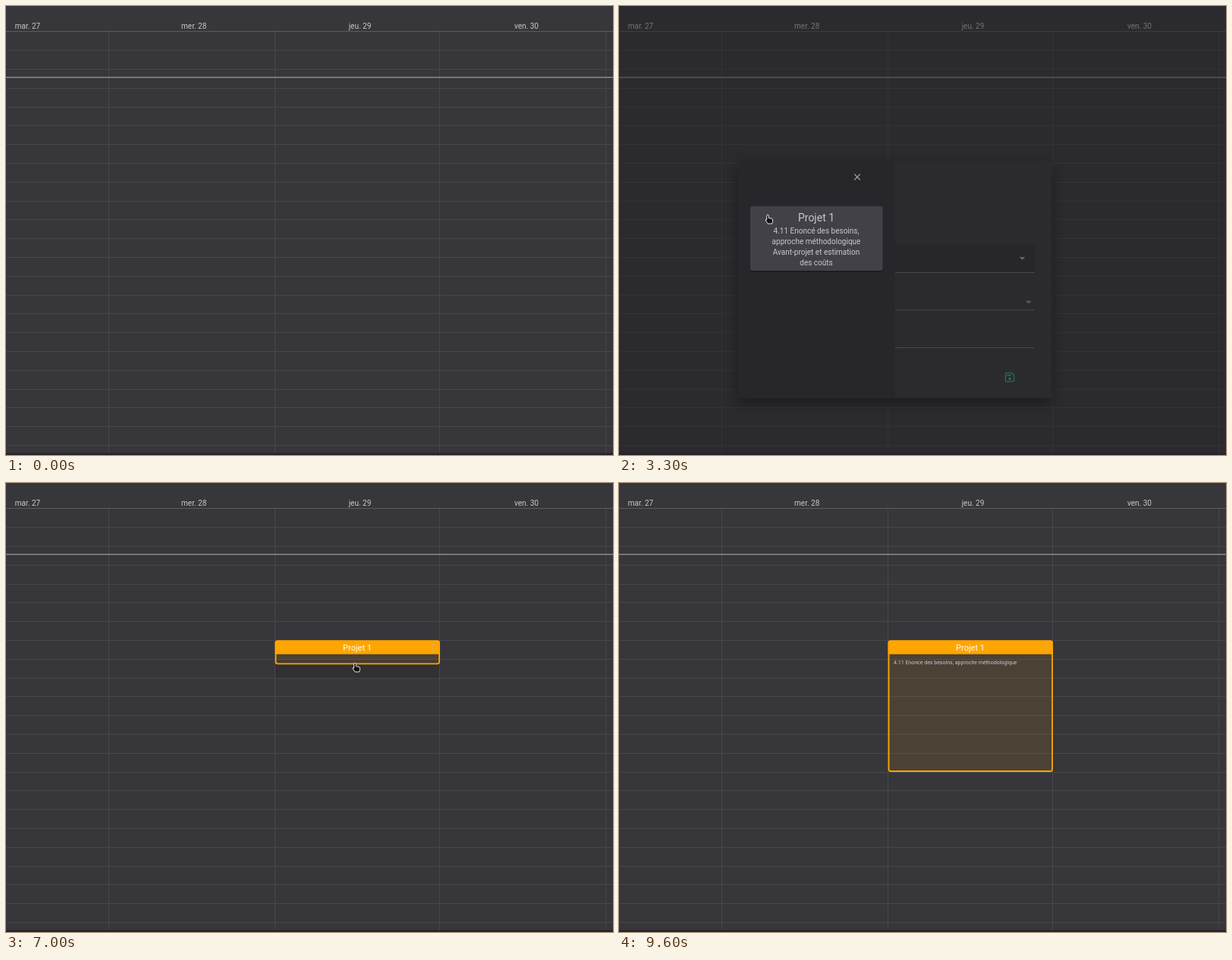
An HTML page that plays this animation: 800x592 px, repeating every 9.9 s.

```html
<!DOCTYPE html>
<html lang="fr">
<head>
<meta charset="utf-8">
<title>Nouvelle heure</title>
<style>
  html, body { margin: 0; width: 100%; height: 100%; overflow: hidden; background: #37363b; }
  svg { display: block; }
  text { font-family: Roboto, sans-serif; font-size: 11px; fill: #c9c9cb; }
  .mid { text-anchor: middle; }
  .small { font-size: 8.25px; }
  .medium { font-size: 10px; }
  .muted { fill: #98979b; }
  .rule { fill: #757478; }
  .icon { fill: none; stroke: #cfcfd1; stroke-width: 1.3; }
  .scrim { fill: rgb(32 31 35 / .5); }

  #backdrop, #dialog, #veil, #drawer, #starHover, #saveHover,
  .empty, .filled, #event, #note { animation: 9.9s linear infinite; }

  #backdrop { animation-name: backdrop; }
  @keyframes backdrop {
    0%, 14.4% { opacity: 0; }
    16.1%, 53% { opacity: 1; }
    55.5%, 100% { opacity: 0; }
  }
  #dialog {
    animation-name: dialog;
    transform-origin: 363px 360px;
    filter: drop-shadow(0 7px 9px rgb(0 0 0 / .36));
  }
  @keyframes dialog {
    0%, 14.4% { opacity: 0; transform: scale(.92); }
    16.1%, 53% { opacity: 1; transform: none; }
    55%, 100% { opacity: 0; transform: none; }
  }
  #veil { animation-name: veil; }
  @keyframes veil {
    0%, 30.8% { opacity: 0; }
    33.2%, 40.9% { opacity: 1; }
    43.4%, 100% { opacity: 0; }
  }
  #drawer { animation-name: drawer; }
  @keyframes drawer {
    0% { transform: translateX(-225px); }
    30.8% { transform: translateX(-225px); animation-timing-function: ease-out; }
    33.2% { transform: none; }
    40.9% { transform: none; animation-timing-function: ease-in-out; }
    43.4%, 100% { transform: translateX(-225px); }
  }

  #starHover, #saveHover, .empty, .filled, #event, #note { animation-timing-function: step-end; }
  #starHover { animation-name: star-hover; }
  @keyframes star-hover { 0% { opacity: 0; } 25.2% { opacity: 1; } 33.3%, 100% { opacity: 0; } }
  #saveHover { animation-name: save-hover; }
  @keyframes save-hover { 0% { opacity: 0; } 51.5% { opacity: 1; } 56%, 100% { opacity: 0; } }
  .empty { animation-name: empty; }
  @keyframes empty { 0% { opacity: 1; } 41.4%, 100% { opacity: 0; } }
  .filled { animation-name: filled; }
  @keyframes filled { 0% { opacity: 0; } 41.4%, 100% { opacity: 1; } }
  #event { animation-name: event; }
  @keyframes event { 0% { opacity: 0; } 54.5%, 100% { opacity: 1; } }
  #note { animation-name: note; }
  @keyframes note { 0% { opacity: 0; } 84.8%, 100% { opacity: 1; } }
</style>
</head>
<body>
<svg width="800" height="592" viewBox="0 0 800 592">
  <defs>
    <clipPath id="frame"><rect x="157" y="204" width="413" height="313" rx="4"/></clipPath>
    <path id="caret" d="M-3.800-2h7.600l-3.800 3.800z"/>
    <path id="cross" d="M-3.800-3.800 3.800 3.800M3.800-3.800-3.800 3.800" fill="none" stroke="#b4b3b7" stroke-width="1.1"/>
  </defs>

  <rect width="800" height="592" fill="#37363b"/>
  <rect id="slot" x="355" width="216" height="24" fill="#313035"/>
  <g id="grid" fill="#47464b"></g>
  <rect y="33" width="800" height="1" fill="#5b5a5f"/>
  <rect y="93.600" width="800" height="1" fill="#b3b3b5"/>
  <g>
    <text class="mid medium" x="28.5" y="30">mar. 27</text>
    <text class="mid medium" x="247.7" y="30">mer. 28</text>
    <text class="mid medium" x="466.5" y="30">jeu. 29</text>
    <text class="mid medium" x="686" y="30">ven. 30</text>
  </g>

  <g id="event">
    <rect id="body" x="355.5" y="208.5" width="215.5" rx="2.5"
          fill="#ffa500" fill-opacity=".1" stroke="#ffa500" stroke-width="1.8"/>
    <path d="M354.6 225.700v-15.200a3 3 0 0 1 3-3h211.300a3 3 0 0 1 3 3v15.200z" fill="#ffa500"/>
    <g fill="#c4b596">
      <circle cx="562.500" cy="213" r="1.100"/>
      <circle cx="562.500" cy="217.500" r="1.100"/>
      <circle cx="562.500" cy="222" r="1.100"/>
    </g>
    <text class="mid" x="463" y="221" style="fill:#fff">Projet 1</text>
    <text id="note" x="362" y="239" style="font-size:7px">4.11 Enoncé des besoins, approche méthodologique</text>
  </g>

  <rect id="backdrop" class="scrim" width="800" height="592"/>
  <rect y="589.5" width="800" height="2.500" fill="#2a2128"/>

  <g id="dialog"><g clip-path="url(#frame)">
    <rect x="157" y="204" width="413" height="313" fill="#37363b"/>
    <text x="173.5" y="230" style="font-size:14px;font-weight:500">Nouvelle heure</text>

    <circle id="starHover" cx="195.500" cy="280.500" r="16" fill="#414045"/>
    <path transform="translate(187.1 272.2) scale(.7)" fill="#c9c9cb"
          d="M12 17.270 18.180 21l-1.640-7.030L22 9.240l-7.190-.610L12 2 9.190 8.630 2 9.240l5.460 4.730L5.820 21z"/>

    <path d="M179 351v-34a3 3 0 0 1 3-3h363a3 3 0 0 1 3 3v34z" fill="#2f2e32"/>
    <rect class="rule" x="179" y="351" width="369" height="1"/>
    <text class="small" x="187" y="328">Tâche</text>
    <text class="empty" x="187" y="342" style="fill:#77767b">Search</text>
    <g class="filled">
      <text x="187" y="342">Avant-projet et estimation des coûts - 4.11 Enoncé des besoin…</text>
      <use href="#cross" x="508" y="332.500"/>
    </g>
    <use href="#caret" x="531.500" y="333" fill="#b4b3b7"/>

    <text class="empty muted" x="179" y="394.500">Type de temps</text>
    <g class="filled">
      <text class="small" x="179" y="376.500">Type de temps</text>
      <text x="179" y="394">Travail</text>
    </g>
    <use href="#caret" x="539.800" y="390.700" fill="#98979b"/>
    <rect class="rule" x="179" y="400.500" width="369" height="1"/>

    <text class="muted" x="179" y="444">Commentaire</text>
    <rect class="rule" x="179" y="450" width="369" height="1"/>

    <g class="icon" transform="translate(212 489.5)">
      <circle r="6.300"/>
      <path d="M-2.500-2.500 2.500 2.500M2.500-2.500-2.500 2.500"/>
    </g>
    <circle id="saveHover" cx="515" cy="490" r="16" fill="#374441"/>
    <g class="icon" transform="translate(515 489.5)" style="stroke:#1fc48d">
      <path d="M-5.600-4.600a1 1 0 0 1 1-1h7.500l2.700 2.700v7.500a1 1 0 0 1-1 1h-9.200a1 1 0 0 1-1-1z"/>
      <path d="M-3.800-2.700h5.600" stroke-width="1.800"/>
      <circle cy="2" r="1.800" fill="#1fc48d" stroke="none"/>
    </g>

    <rect id="veil" class="scrim" x="157" y="204" width="413" height="313"/>
    <g id="drawer">
      <rect x="157" y="204" width="207" height="313" fill="#27262b"/>
      <use href="#cross" x="314" y="225.500"/>
      <rect x="173" y="265" width="174.500" height="86" rx="3" fill="#1d1c20"/>
      <rect x="173" y="264" width="174.500" height="85" rx="3" fill="#424147"/>
      <text class="mid" x="260" y="283.500" style="font-size:14px">Projet 1</text>
      <text class="mid medium" x="260" y="300">4.11 Enoncé des besoins,</text>
      <text class="mid medium" x="260" y="314">approche méthodologique</text>
      <text class="mid medium" x="260" y="327.700">Avant-projet et estimation</text>
      <text class="mid medium" x="260" y="341.500">des coûts</text>
    </g>
  </g></g>

  <g id="pointer" fill="#111" stroke="#fff" stroke-width=".9" stroke-linejoin="round">
    <path id="hand" d="M-2.800 1v-5.300q0-1.500 1.300-1.500t1.300 1.500v2.800l4 .8q1.300.3 1.300 1.700v2.500l-1 2.500h-5.300l-3-4q-.6-1.200.4-1.600z"/>
    <path id="arrow" d="M-4-7v11.500l2.700-2.400 2 4.600 2-.9-2-4.400h3.500z"/>
  </g>
</svg>
<script>
  const LOOP = 9900, TOP = 33.4, ROW = 24.8;
  const $ = id => document.getElementById(id);
  const rowY = k => Math.round(TOP + ROW * k);

  function addLine(x, y, width, height) {
    const line = document.createElementNS('http://www.w3.org/2000/svg', 'rect');
    Object.entries({ x, y, width, height }).forEach(([k, v]) => line.setAttribute(k, v));
    $('grid').append(line);
  }
  for (let k = 1; k <= 22; k++) addLine(0, rowY(k), 800, 1);
  [135, 354, 571, 790].forEach(x => addLine(x, 34, 1, 556));

  // Each key: time, then values, linear in between.
  const path = [
    [100, 466, 588], [300, 450, 480], [600, 398, 275], [800, 372, 206], [900, 370, 223],
    [2000, 370, 223], [2200, 300, 258], [2400, 212, 302], [2500, 186, 304], [2600, 185.5, 291],
    [2900, 197.5, 281], [4200, 197.5, 281], [4400, 290, 400], [4600, 396.5, 479.5],
    [4800, 470, 494], [5000, 514.5, 493], [5700, 514.5, 493], [6100, 490, 360],
    [6500, 462, 229], [6800, 462, 229], [7100, 461, 250], [7600, 460, 339.5],
    [7800, 457, 372], [8100, 453, 389], [9499, 453, 389], [9500, 647, 235]
  ];
  const bottoms = [[6800, 231], [7100, 242], [7600, 315], [7800, 348], [8100, 380]];

  function at(keys, t) {
    const i = keys.findIndex(k => k[0] > t);
    if (i < 0) return keys[keys.length - 1].slice(1);
    if (i === 0) return keys[0].slice(1);
    const a = keys[i - 1], b = keys[i], f = (t - a[0]) / (b[0] - a[0]);
    return a.slice(1).map((v, n) => v + (b[n + 1] - v) * f);
  }
  const within = (t, a, b) => t >= a && t < b;
  const show = (id, on) => { $(id).style.visibility = on ? 'visible' : 'hidden'; };

  function draw(t) {
    const [x, y] = at(path, t);
    const visible = within(t, 100, 9600);
    const arrow = within(t, 1550, 2500) || within(t, 4300, 4950);
    $('pointer').setAttribute('transform', `translate(${x} ${y})`);
    show('hand', visible && !arrow);
    show('arrow', visible && arrow);

    $('slot').setAttribute('y', rowY(Math.floor((y - TOP) / ROW)) + 1);
    const [bottom] = at(bottoms, t);
    show('slot', within(t, 100, 1500) || (within(t, 5500, 8000) && y > bottom + 4));
    $('body').setAttribute('height', bottom - 208.5);
  }

  const start = performance.now();
  function tick() {
    draw((performance.now() - start) % LOOP);
    requestAnimationFrame(tick);
  }
  tick();
</script>
</body>
</html>
```
